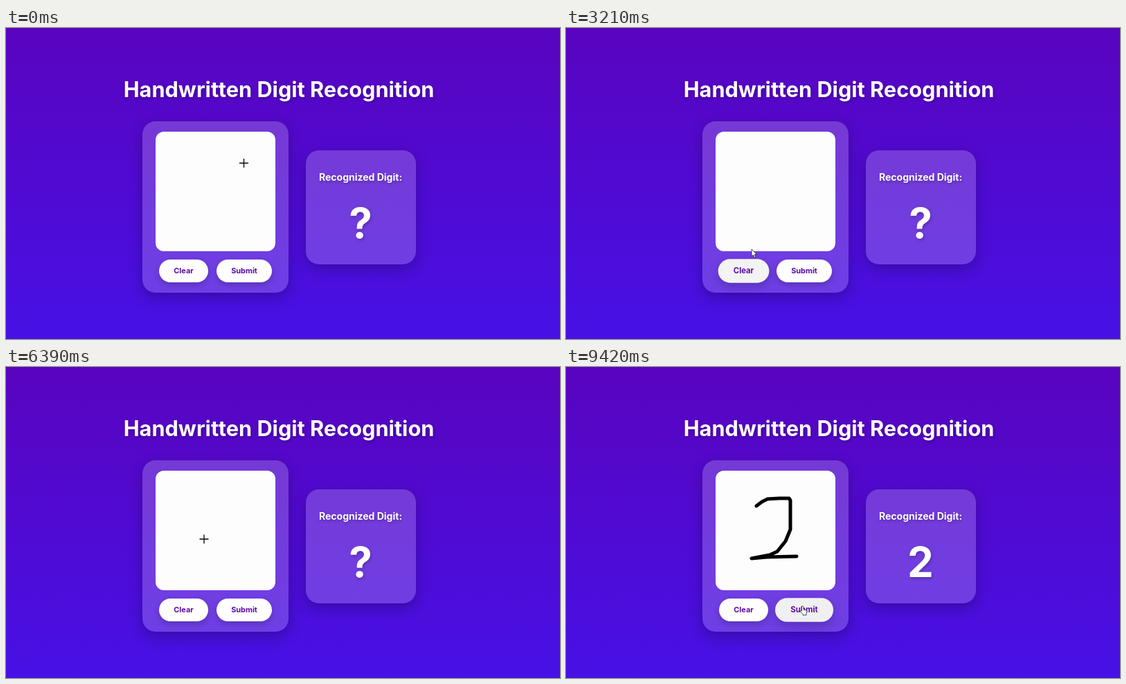
An HTML page for the animation above (9450 ms loop, 800 px wide and 450 px high).

```html
<!DOCTYPE html>
<html lang="en">
<head>
<meta charset="utf-8">
<title>Handwritten Digit Recognition</title>
<style>
  html, body { margin: 0; width: 100%; height: 100%; overflow: hidden; }
  body {
    background: linear-gradient(#5904bf, #4711e5);
    font-family: Inter, sans-serif;
    font-weight: 700;
    font-optical-sizing: none;
    color: #fff;
  }
  div, svg { position: absolute; }
  .text {
    transform: translate(-50%, -50%);
    white-space: nowrap;
    text-shadow: 1px 2px 4px rgba(0, 0, 0, .25);
  }
  .panel {
    border-radius: 19px;
    background: rgba(255, 255, 255, .2);
    box-shadow: 0 7px 20px rgba(0, 0, 0, .25);
  }
  .button {
    top: 335px;
    height: 33px;
    border-radius: 16.5px;
    background: #fff;
    color: #5a0aa8;
    font-size: 10.9px;
    line-height: 33px;
    text-align: center;
  }
  #title { left: 394px; top: 87.5px; font-size: 30.7px; }
  #label { left: 512px; top: 215px; font-size: 14px; }
  #digit { left: 512px; top: 282px; font-size: 60px; }
  #pad { left: 197px; top: 135px; width: 211px; height: 248px; }
  #result { left: 433px; top: 176.5px; width: 158.5px; height: 165.5px; }
  #paper { left: 215.5px; top: 150.3px; width: 173.5px; height: 172.5px; border-radius: 12px; background: #fdfdfd; }
  #clear { left: 221px; width: 71px; }
  #submit { left: 304px; width: 80px; }
  svg { left: 0; top: 0; }
  .ink { fill: none; stroke: #000; stroke-width: 5; stroke-linecap: round; stroke-linejoin: round; }
  #arrow, #hand { fill: #fff; stroke: #222; stroke-width: .8; stroke-linejoin: round; }
  #cross { stroke: #000; stroke-width: 1.3; }
</style>
</head>
<body>
<div id="title" class="text">Handwritten Digit Recognition</div>
<div id="pad" class="panel"></div>
<div id="paper"></div>
<div id="clear" class="button">Clear</div>
<div id="submit" class="button">Submit</div>
<div id="result" class="panel"></div>
<div id="label" class="text">Recognized Digit:</div>
<div id="digit" class="text">?</div>
<svg width="800" height="450" viewBox="0 0 800 450">
  <path class="ink" d="M341 184L330 185 315 184 289 185 283 194 280 204 280 219 285 229 295 237 308 247 316 257 318 269 312 279 299 284 275 283 265 276 262 264 273 251 283 245 294 237 318 220 332 205 338 195 342 184"/>
  <path class="ink" d="M278 205L271 231 268 253 268 272 275 281 298 281 308 274 319 261 328 243 330 225 330 208 327 193 323 184 310 186 299 190 289 195 283 203"/>
  <path class="ink" d="M275 201L283 195 291 191 308 190 322 190 324 193 324 235 317 252 305 267 294 272 268 277 290 275 333 274"/>
  <g id="cursor">
    <path id="cross" d="M-6.5 0H6.5M0-6.5V6.5"/>
    <path id="arrow" d="M0 0V10.5L2.4 8.3 4.2 12.2 5.9 11.4 4.2 7.7H7.4Z"/>
    <path id="hand" d="M-2.5-5.5Q-1.2-7 0-5.5V-1L4.2 0Q5 .4 4.8 2L4 5V7H-1V5.5L-5 1.2Q-4.5-.5-2.5 1Z"/>
  </g>
</svg>
<script>
const LOOP = 9450;
const HOVER_TIME = 200;
const $ = id => document.getElementById(id);
const clamp = v => Math.max(0, Math.min(1, v));
const smooth = v => v * v * (3 - 2 * v);

// Each digit: writing interval, time the answer shows, time it is cleared.
const paths = document.querySelectorAll('.ink');
const strokes = [
  { text: '8', start: 200, end: 1500, answer: 2350, clear: 3010 },
  { text: '0', start: 3500, end: 4340, answer: 5330, clear: 6030 },
  { text: '2', start: 6600, end: 7540, answer: 8900, clear: LOOP }
].map((stroke, i) => ({ ...stroke, path: paths[i], length: paths[i].getTotalLength() }));

const pointer = [
  [0, 343.5, 195.5], [1500, 345, 196], [1580, 347, 197], [2020, 343, 352],
  [2700, 343, 352], [2940, 256, 352], [3060, 256, 352], [3210, 268, 320],
  [3500, 281, 217], [4340, 286, 215], [4360, 289, 214], [4790, 289, 214],
  [5040, 343, 352], [5700, 343, 352], [5940, 256, 352], [6080, 256, 352],
  [6390, 286, 249], [6600, 278, 213], [7540, 336, 286], [7640, 336, 286],
  [7960, 343, 352], [LOOP, 343, 352]
];
const hovers = {
  clear: [[2900, 3150], [5900, 6150]],
  submit: [[1990, 2740], [5010, 5740], [7920, LOOP + HOVER_TIME]]
};

function pointerAt(t) {
  const stroke = strokes.find(s => t >= s.start && t <= s.end);
  if (stroke) {
    const progress = (t - stroke.start) / (stroke.end - stroke.start);
    const tip = stroke.path.getPointAtLength(stroke.length * progress);
    return [tip.x + 3, tip.y + 12];
  }
  const next = pointer.findIndex(p => p[0] > t);
  const [t0, x0, y0] = pointer[next - 1];
  const [t1, x1, y1] = pointer[next];
  const k = smooth((t - t0) / (t1 - t0));
  return [x0 + (x1 - x0) * k, y0 + (y1 - y0) * k];
}

function hoverAmount(spans, t) {
  return Math.max(...spans.map(([from, to]) =>
    smooth(clamp((t - from) / HOVER_TIME)) - smooth(clamp((t - to) / HOVER_TIME))));
}

function render(t) {
  for (const { path, length, start, end, clear } of strokes) {
    path.style.display = t >= start && t < clear ? '' : 'none';
    path.style.strokeDasharray = `${length * clamp((t - start) / (end - start))} 9999`;
  }
  const shown = strokes.find(s => t >= s.answer && t < s.clear);
  $('digit').textContent = shown ? shown.text : '?';

  for (const id in hovers) {
    const amount = hoverAmount(hovers[id], t);
    const grey = 255 - 15 * amount;
    const style = $(id).style;
    style.transform = `scale(${1 + .05 * amount})`;
    style.background = `rgb(${grey}, ${grey}, ${grey})`;
    style.boxShadow = `0 ${4 + 2 * amount}px ${10 + 4 * amount}px rgba(0, 0, 0, .2)`;
  }

  const [x, y] = pointerAt(t);
  const onButton = y > 334 && (x < 292 || x > 304);
  const kind = onButton ? 'hand' : y < 319.5 ? 'cross' : 'arrow';
  $('cursor').setAttribute('transform', `translate(${x} ${y})`);
  for (const id of ['cross', 'arrow', 'hand']) $(id).style.display = id === kind ? '' : 'none';
}

const began = performance.now();
function tick() {
  render((performance.now() - began) % LOOP);
  requestAnimationFrame(tick);
}
tick();
</script>
</body>
</html>
```
